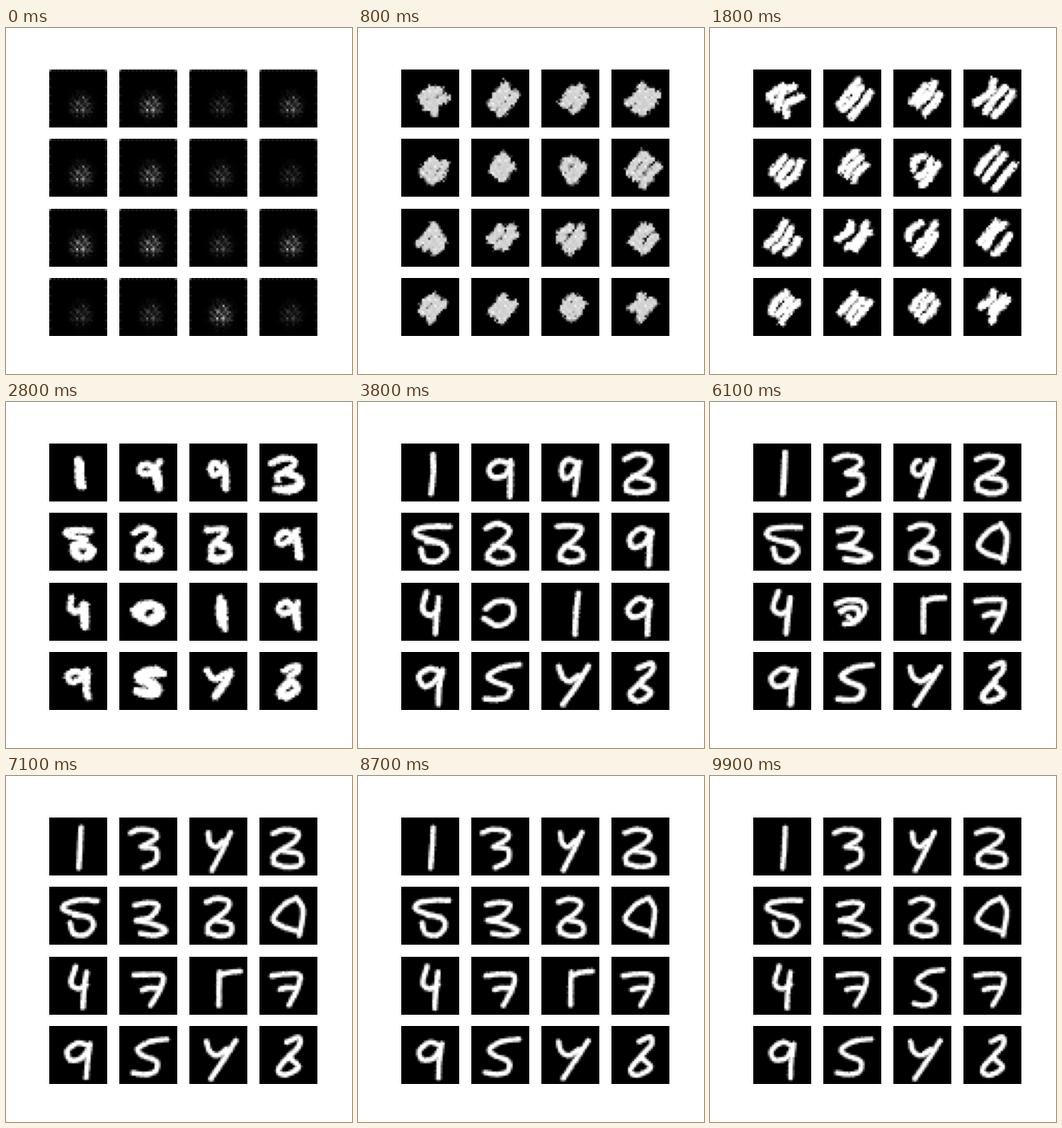
These frames come from a looping animation (400 by 400 pixels, 10 s). A matplotlib script:

```python
import numpy as np
import matplotlib.pyplot as plt
from matplotlib.animation import FuncAnimation

FRAMES, N, SAMPLES = 100, 28, 60
PX = 67 / N  # screen pixels per image pixel
MID = np.array([35, 34])
STEPS = [18, 38, 52, 71, 87, 99]
yy, xx = np.mgrid[0:N, 0:N]

# Pen strokes as x, y key points inside a 67 px square
GLYPHS = {
    "0": ([43,13, 28,21, 16,37, 26,46, 45,52], [43,13, 50,28, 46,56]),
    "1": ([37,12, 36,35, 34,58],),
    "2": ([18,21, 34,18, 45,22, 36,34, 19,39], [19,39, 36,42, 53,50, 42,56, 25,54]),
    "3": ([13,18, 24,14, 40,16, 42,24, 26,34], [26,34, 42,37, 42,50, 28,58]),
    "4": ([30,11, 25,30, 33,37, 43,32], [43,18, 40,40, 39,59]),
    "5": ([55,15, 35,18, 21,27, 27,34, 43,41, 42,52, 30,56, 16,54],),
    "6": ([32,18, 45,13, 46,22, 36,33], [36,33, 22,50, 30,57, 45,48, 36,38]),
    "7": ([16,22, 31,20, 48,22, 46,38, 36,56], [26,38, 34,36, 43,36]),
    "8": ([17,18, 30,14, 43,18, 40,28, 20,43, 19,53], [19,53, 32,57, 46,54, 45,43, 26,38]),
    "9": ([46,23, 33,19, 21,29, 25,39, 38,37, 46,24], [47,21, 44,40, 43,60]),
    "s": ([55,16, 38,16, 20,19, 18,27, 44,36], [30,33, 46,36, 51,46, 42,56, 28,54, 24,42]),
    "o": ([16,30, 28,22, 45,24, 46,40, 30,50, 14,42],),
    "r": ([29,18, 28,36, 28,56], [29,22, 42,18, 57,17]),
    "y": ([20,18, 23,29, 32,34, 43,27], [54,17, 42,36, 25,61]),
}

# What each cell reads as at the later steps, its x shift and its width
CELLS = [
    ("11111", 0, 1), ("93333", 0, 1), ("99yyy", -2, 0.75), ("88888", 0, 1.1),
    ("sssss", 0, 1), ("82222", 0, 1), ("88888", 2, 0.95), ("90000", 0, 1),
    ("44444", 0, 1), ("oo777", 1, 1), ("1rrr5", 5, 0.85), ("97777", -2, 1),
    ("99999", 0, 1), ("55555", 0, 1), ("yyyyy", 0, 1), ("66666", 0, 1),
]


def spline(p):
    """Catmull-Rom curve through the points, in image pixels."""
    p = p / PX - 0.5
    q = np.vstack([2 * p[0] - p[1], p, 2 * p[-1] - p[-2]])
    s = np.linspace(0, len(p) - 1, SAMPLES)
    i = np.minimum(s.astype(int), len(p) - 2)
    u = (s - i)[:, None]
    a, b, c, d = q[i], q[i + 1], q[i + 2], q[i + 3]
    return b + u / 2 * (c - a + u * (2*a - 5*b + 4*c - d + u * (3*b - a - 3*c + d)))


def scribble(rnd):
    """Three thick slanted strokes side by side."""
    curves = []
    for side in (-1, 0, 1):
        along = np.array([0.62, -0.78]) * rnd.uniform(9, 18)
        mid = MID + [1, 0] + np.array([8, 7]) * side + rnd.normal(0, 2, 2)
        curves.append(spline(np.array([mid - along, mid + rnd.normal(0, 3, 2), mid + along])))
    return np.array(curves)


def write(name, shift, wide, wander, rnd):
    curves = []
    for flat in GLYPHS[name]:
        p = np.array(flat, float).reshape(-1, 2)
        p = MID + (p - MID) * [wide, 1] + [shift, 0]
        curves.append(spline(p + rnd.normal(0, wander, p.shape)))
    return np.array(curves + [curves[-1]] * (3 - len(curves)))


def plan(cell):
    rnd = np.random.default_rng(cell + 20)
    names, shift, wide = CELLS[cell]
    later = [write(g, shift, wide, 1.2 * (1 - s / 99), rnd) for g, s in zip(names, STEPS[1:])]
    return [scribble(rnd)] + later


poses = [plan(cell) for cell in range(16)]

# Dotted glow of the first step, shared by all cells
rng = np.random.default_rng(4)
glow = np.exp(-((xx - 15) / 4) ** 2 - ((yy - 17) / 4.6) ** 2)
dots = np.where((xx % 3 == 1) & (yy % 3 == 1), 1, 0.4) * rng.random((N, N))
start = 1.6 * glow * dots
start[20, 10:21] += 0.12
rim = np.zeros((N, N))
rim[0, ::2] = rim[::4, 0] = rim[::4, -1] = 0.14
rim[0, [0, -1]] = 0.45
level = rng.uniform(0.35, 1.1, 16)


def ink(curves, width, rough):
    x, y = curves.reshape(-1, 2).T
    near = np.sqrt(((xx[..., None] - x) ** 2 + (yy[..., None] - y) ** 2).min(-1))
    return np.clip(width / PX / 2 - near + rough + 0.5, 0, 1)


def cell_image(cell, step):
    rnd = np.random.default_rng(1000 * cell + step)
    rough = rnd.normal(0, 1, (N, N)) * (0.08 + 0.4 * max(0, 1 - step / 40))
    width = np.interp(step, [0, 18, 38, 99], [12, 9, 6.6, 6])
    keys = poses[cell]
    if step <= STEPS[0]:
        u = step / STEPS[0]
        curves = 15 + (keys[0] - 15) * (0.55 + 0.45 * u)
        grow = min(1, step / 4)
        speckle = 1 - 0.7 * (1 - u) ** 2 * (1 - dots)
        img = (1 - grow) * level[cell] * start + grow * ink(curves, width, rough) * speckle
    else:
        k = np.searchsorted(STEPS, step)
        u = (step - STEPS[k - 1]) / (STEPS[k] - STEPS[k - 1])
        sway = rnd.normal(0, 0.3, (3, 1, 2)) * np.sin(np.pi * u)
        if k == 1:
            u = 1 - (1 - u) ** 2
        img = ink(keys[k - 1] + (keys[k] - keys[k - 1]) * u + sway, width, rough)
    return np.clip(img + rim * max(0, 1 - step / 8) + 0.03 * rim * (step < 34), 0, 1)


fig, axes = plt.subplots(4, 4, figsize=(4, 4), dpi=100)
views = []
for ax in axes.flat:
    views.append(ax.imshow(np.zeros((N, N)), cmap="gray", vmin=0, vmax=1))
    ax.axis("off")


def update(step):
    for cell, view in enumerate(views):
        view.set_data(cell_image(cell, step))
    return views


anim = FuncAnimation(fig, update, frames=FRAMES, interval=100, repeat=True, repeat_delay=0)
plt.show()
```
